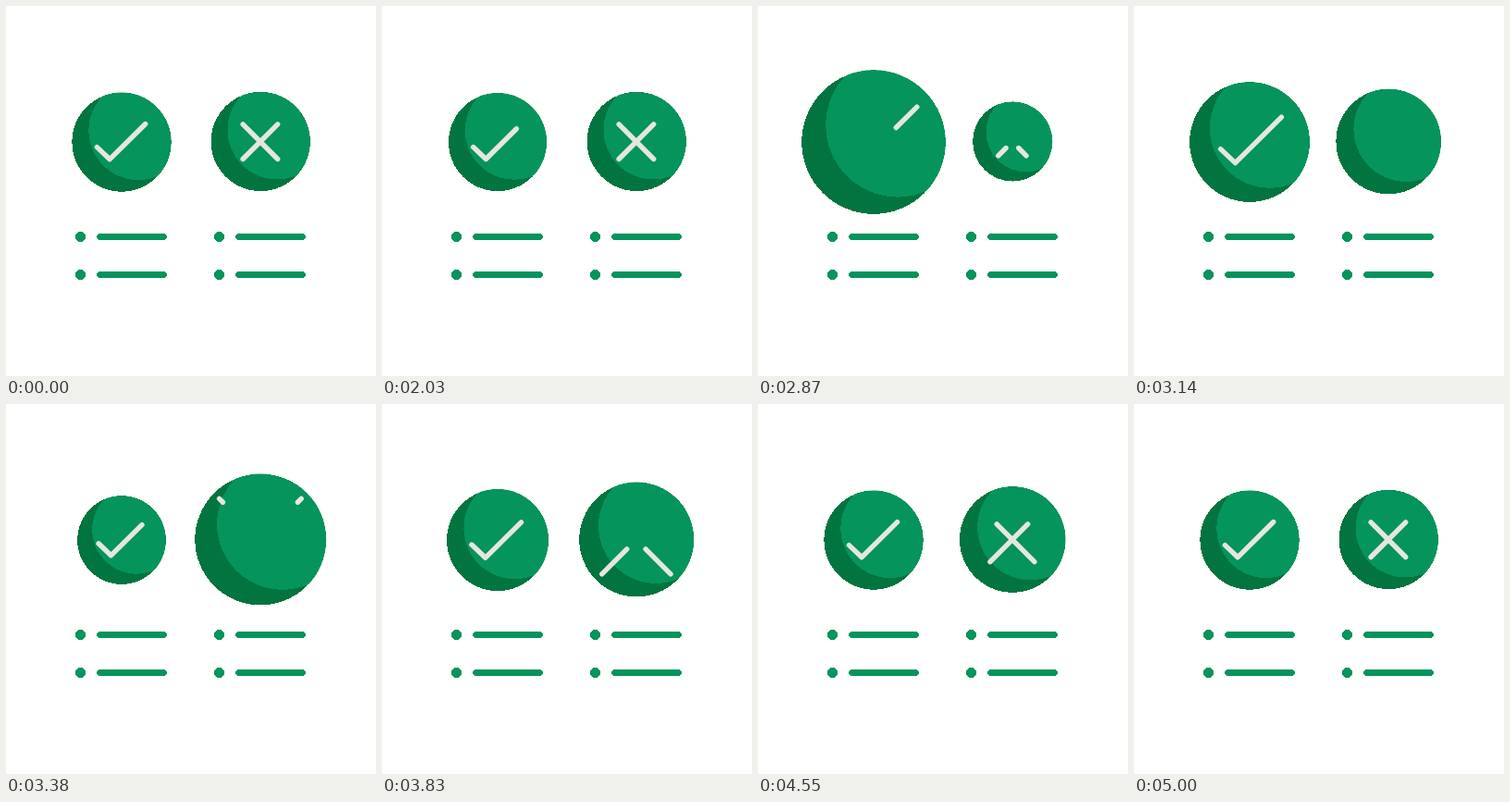
Write an HTML page that moves like this. It is 400 by 400 pixels and loops after 5.12 s.

```html
<!DOCTYPE html>
<html lang="en">
<head>
<meta charset="utf-8">
<title>Yes and no lists</title>
<style>
  html, body { margin: 0; width: 100%; height: 100%; overflow: hidden; background: #fff; }
  svg { display: block; width: 100vw; height: 100vh; }
  .mark { fill: none; stroke: #e6e6e1; stroke-width: 5.4; stroke-linecap: round; stroke-linejoin: round; }
  .light { fill: #05945c; }
  .dark { fill: #02743f; }
  .row line { stroke: #05945c; stroke-width: 6.6; stroke-linecap: round; }
  .crisp { shape-rendering: crispEdges; }
</style>
</head>
<body>
<svg viewBox="0 0 400 400">
  <defs>
    <clipPath id="ball"><circle r="1"/></clipPath>
    <g id="disc" class="crisp">
      <circle class="dark" r="1"/>
      <g clip-path="url(#ball)"><circle class="light" cx=".335" cy="-.235" r="1"/></g>
    </g>
    <g id="row" class="row crisp">
      <circle class="light" cx="80.5" r="5.5"/>
      <line x1="101.3" x2="170.5"/>
    </g>
  </defs>
  <use href="#row" y="249.5"/>
  <use href="#row" y="290.5"/>
  <use href="#row" x="150" y="249.5"/>
  <use href="#row" x="150" y="290.5"/>
  <use id="yesDisc" href="#disc"/>
  <path id="yesMark" class="mark"/>
  <use id="noDisc" href="#disc"/>
  <path id="noMark" class="mark"/>
</svg>
<script>
const LOOP = 5120, START = 2030, STEP = 30, END = 5000;
const RADIUS = 53.6, ERASE = 510;
const $ = id => document.getElementById(id);
const mix = (a, b, u) => a + (b - a) * u;
const clamp = u => Math.min(1, Math.max(0, u));
const ease = u => (1 - Math.cos(Math.PI * u)) / 2;

// Swings with sine easing from one turning point [time, value] to the next.
const swing = (...turns) => t => turns.reduce((value, [time, next], i) => {
  if (i === 0) return next;
  const before = turns[i - 1][0];
  return mix(value, next, ease(clamp((t - before) / (time - before))));
}, 0);

// A mark is a path with a visible window between tail and head.
const TIP = [25.5, -19.5], CORNER = [-13, 18.7], FOOT = [-26.8, 5.6];
const along = (a, b, u) => [mix(a[0], b[0], u), mix(a[1], b[1], u)];
const LONG = Math.hypot(TIP[0] - CORNER[0], TIP[1] - CORNER[1]);
const SHORT = Math.hypot(FOOT[0] - CORNER[0], FOOT[1] - CORNER[1]);
const CHECK = LONG + SHORT, ARM = 18.8;

const checkPoint = s => s < LONG
  ? along(TIP, CORNER, s / LONG)
  : along(CORNER, FOOT, (s - LONG) / SHORT);
function checkLines(tail, head) {
  const bend = tail < LONG && head > LONG ? [CORNER] : [];
  return [[checkPoint(tail), ...bend, checkPoint(head)]];
}
const crossLines = (tail, head) =>
  [-1, 1].map(side => [[side * tail, tail], [side * head, head]]);

const badges = [
  {
    disc: $("yesDisc"), mark: $("yesMark"), center: [125, 147.1], markCenter: [125.2, 147],
    lines: checkLines, from: 0, to: CHECK, eraseAt: 1980,
    scale: swing([2000, 1], [2200, .8], [2890, 1.452], [3450, .87], [3990, 1.065], [4500, 1]),
    tail: swing([2900, -9.4], [3380, 1.5], [4900, 0]),
    head: swing([2700, -9.4], [3200, CHECK + 2], [4500, CHECK])
  },
  {
    disc: $("noDisc"), mark: $("noMark"), center: [275.2, 146.5], markCenter: [274.9, 146.7],
    lines: crossLines, from: -ARM, to: ARM, eraseAt: 2500,
    scale: swing([2540, 1], [2760, .775], [3570, 1.405], [4110, .875], [4600, 1.073], [5000, 1]),
    tail: swing([3400, -33.5], [3830, 8.8], [4750, -ARM]),
    head: swing([3330, -33.5], [3700, 32.5], [5000, ARM])
  }
];

function drawBadge(badge, t) {
  const scale = badge.scale(t);
  badge.disc.setAttribute("transform", `translate(${badge.center}) scale(${RADIUS * scale})`);

  const erased = clamp((t - badge.eraseAt) / ERASE);
  const [tail, head] = erased < 1
    ? [mix(badge.from, badge.to, erased), badge.to]
    : [badge.tail(t), badge.head(t)];
  const [x, y] = badge.markCenter;
  const place = ([px, py]) => `${x + px * scale} ${y + py * scale}`;
  const path = head - tail < 0.1 ? "" :
    badge.lines(tail, head).map(line => "M" + line.map(place).join("L")).join("");
  badge.mark.setAttribute("d", path);
}

function draw(ms) {
  const t = ms % LOOP;
  const shown = t < START ? 0 : Math.min(END, START + Math.floor((t - START) / STEP) * STEP);
  badges.forEach(badge => drawBadge(badge, shown));
}

const begin = performance.now();
function tick() {
  draw(performance.now() - begin);
  requestAnimationFrame(tick);
}
tick();
</script>
</body>
</html>
```
